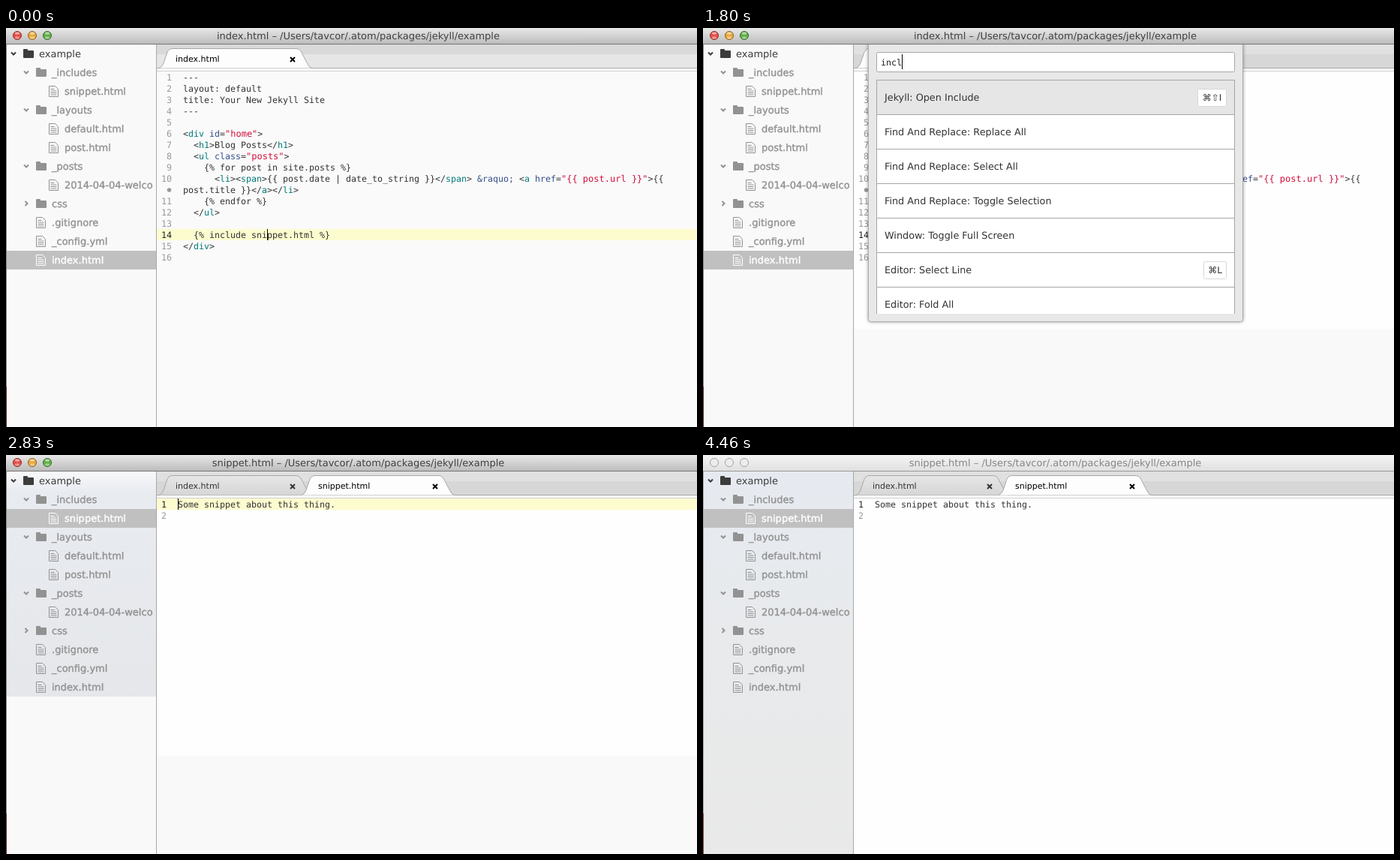
Animation of 921x532 px, one loop 4540 ms. Source, as an HTML page:

```html
<!DOCTYPE html>
<html lang="en">
<head>
<meta charset="utf-8">
<title>Editor: open include</title>
<style>
html, body { margin: 0; width: 100%; height: 100%; overflow: hidden; background: #f9f9f9; }
svg { display: block; width: 921px; height: 532px; }
text { white-space: pre; text-rendering: geometricPrecision; }
.ui { font: 13px "DejaVu Sans", "Noto Sans", sans-serif; }
.tree { stroke-width: .4px; }
.item { font: 12.8px "DejaVu Sans", "Noto Sans", sans-serif; }
.tab { font: 11px "DejaVu Sans", "Noto Sans", sans-serif; }
.key { font: 12px "DejaVu Sans", "Noto Sans", sans-serif; }
.code { font: 11.63px "DejaVu Sans Mono", "Noto Sans Mono", monospace; }
.string { font-size: 12px; }
.popup { filter: drop-shadow(0 0 2px rgba(0,0,0,.4)); }
</style>
</head>
<body>
<svg id="stage" viewBox="0 0 921 532" xmlns="http://www.w3.org/2000/svg">
  <defs>
    <linearGradient id="bar" x2="0" y2="1"><stop stop-color="#e8e8e8"/><stop offset="1" stop-color="#bababa"/></linearGradient>
    <linearGradient id="barIdle" x2="0" y2="1"><stop stop-color="#f5f5f5"/><stop offset="1" stop-color="#dfdfdf"/></linearGradient>
    <linearGradient id="tint" x2="0" y2="1"><stop stop-color="#f8f9fa"/><stop offset=".09" stop-color="#e8ebf0"/><stop offset="1" stop-color="#e5e7ea"/></linearGradient>
    <linearGradient id="tintIdle" x2="0" y2="1"><stop stop-color="#e6eaf0"/><stop offset=".5" stop-color="#e8eaeb"/><stop offset="1" stop-color="#e9e9e9"/></linearGradient>
    <linearGradient id="tabOff" x2="0" y2="1"><stop stop-color="#e6e6e6"/><stop offset="1" stop-color="#d6d6d6"/></linearGradient>
    <clipPath id="sideClip"><rect y="22" width="200" height="510"/></clipPath>
    <clipPath id="listClip"><rect x="231" y="69" width="479" height="312"/></clipPath>
  </defs>
  <g id="scene"></g>
</svg>
<script>
const LOOP = 4540;
const PATH = ' – /Users/tavcor/.atom/packages/jekyll/example';
const ROW = 15, CHAR = 7, TOP = 58;

const SOURCE = [
  '---', 'layout: default', 'title: Your New Jekyll Site', '---', '',
  '<div id="home">', '  <h1>Blog Posts</h1>', '  <ul class="posts">',
  '    {% for post in site.posts %}',
  '      <li><span>{{ post.date | date_to_string }}</span> &raquo; <a href="{{ post.url }}">{{',
  'post.title }}</a></li>',
  '    {% endfor %}', '  </ul>', '', '  {% include snippet.html %}', '</div>', ''
];
const WRAPPED = 10, ACTIVE = 14;

const TREE = [
  [0, 'open', 'example'], [1, 'open', '_includes'], [2, 'file', 'snippet.html'],
  [1, 'open', '_layouts'], [2, 'file', 'default.html'], [2, 'file', 'post.html'],
  [1, 'open', '_posts'], [2, 'file', '2014-04-04-welco'], [1, 'shut', 'css'],
  [1, 'file', '.gitignore'], [1, 'file', '_config.yml'], [1, 'file', 'index.html']
];

const INCLUDE = ['Jekyll: Open Include', '⌘⇧I'];
const LISTS = {
  all: [['Application: About'], ['Application: Bring All Windows To Front'], ['Application: Hide', '⌘H'],
    ['Application: Hide Other Applications', '⌥⌘H'], ['Application: Minimize', '⌘M'],
    ['Application: New File', '⌘N'], ['Application: New Window', '⌘⇧N']],
  in: [['Pane: Save Items'], ...[7, 8, 9, 6, 5, 4].map(n => ['Pane: Show Item ' + n, '⌘' + n])],
  inc: [INCLUDE, ['Window: Increase Font Size', '⌘+'], ['Find And Replace: Show', '⌘F'],
    ['Find And Replace: Find Next', '⌘G'], ['Find And Replace: Replace Next'],
    ['Find And Replace: Replace All'], ['Editor: Indent Selected Rows', '⌘]']],
  incl: [INCLUDE, ['Find And Replace: Replace All'], ['Find And Replace: Select All'],
    ['Find And Replace: Toggle Selection'], ['Window: Toggle Full Screen'],
    ['Editor: Select Line', '⌘L'], ['Editor: Fold All']],
  one: [INCLUDE]
};

// Each step changes only the listed parts of the state before it.
const STEPS = [
  [0, { file: 'index', title: 'index', side: 'index', caret: true, fresh: true }],
  [150, { caret: false }],
  [600, { list: 'all', query: '', fresh: false }],
  [1050, { caret: true }],
  [1350, { query: 'i' }],
  [1500, { query: 'in', list: 'in' }],
  [1650, { query: 'inc', list: 'inc' }],
  [1800, { query: 'incl', list: 'incl' }],
  [1940, { query: 'inclu', list: 'one' }],
  [2090, { query: 'include' }],
  [2230, { caret: false }],
  [2680, { list: null, title: 'snippet', caret: true }],
  [2830, { file: 'snippet', side: 'snippet' }],
  [3130, { caret: false }],
  [3420, { caret: true }],
  [3870, { caret: false }],
  [4320, { caret: true }],
  [4460, { caret: false, idle: true }]
];

const esc = s => s.replace(/&/g, '&amp;').replace(/</g, '&lt;');
const rect = (x, y, w, h, fill, more = '') =>
  `<rect x="${x}" y="${y}" width="${w}" height="${h}" fill="${fill}" ${more}/>`;
const box = (x, y, w, h, fill, stroke, r = 0) =>
  rect(x + .5, y + .5, w - 1, h - 1, fill, `stroke="${stroke}" rx="${r}"`);
const path = (d, fill, more = '') => `<path d="${d}" fill="${fill}" ${more}/>`;
const circle = (x, y, r, fill, more = '') =>
  `<circle cx="${x}" cy="${y}" r="${r}" fill="${fill}" ${more}/>`;
const label = (x, y, s, cls, fill, more = '') =>
  `<text x="${x}" y="${y}" class="${cls}" fill="${fill}" ${more}>${s}</text>`;

function highlight(line) {
  const paint = (s, color, cls = '') => `<tspan class="${cls}" fill="${color}">${esc(s)}</tspan>`;
  let out = '', last = 0;
  for (const m of line.matchAll(/(<\/?)(\w+)|(\w+)(?==")|("[^"]*")|(&\w+;)/g)) {
    out += esc(line.slice(last, m.index));
    if (m[2]) out += esc(m[1]) + paint(m[2], '#067a7a');
    else if (m[4]) out += paint(m[4], '#d0103c', 'string');
    else out += paint(m[0], '#34508c');
    last = m.index + m[0].length;
  }
  return out + esc(line.slice(last));
}

function titleBar({ title, idle }) {
  const lights = ['#e5504a', '#eaa93f', '#62b04a'], rims = ['#8c302c', '#8a631f', '#3a6c2b'];
  return rect(0, 0, 921, 22, idle ? 'url(#barIdle)' : 'url(#bar)') +
    rect(0, 21, 921, 1, idle ? '#999' : '#777') +
    lights.map((color, i) => {
      const x = 15 + 20 * i;
      if (idle) return circle(x, 10, 5.5, '#ededed', 'stroke="#a2a2a2"');
      return circle(x, 10, 5.5, color, `stroke="${rims[i]}"`) +
        `<ellipse cx="${x}" cy="7" rx="3" ry="1.5" fill="#fff" opacity=".55"/>` +
        `<ellipse cx="${x}" cy="13" rx="3" ry="1.7" fill="#fff" opacity=".4"/>`;
    }).join('') +
    label(469.5, 15, title + '.html' + PATH, 'ui', idle ? '#858585' : '#404040', 'text-anchor="middle"');
}

function treeIcon(kind, x, y, color) {
  if (kind === 'file') {
    return path(`M${x + .5} ${y - 6.5}h8l4 4v10h-12zM${x + 2.5} ${y - 2.5}h5m-5 2.5h8m-8 2.5h8m-8 2.5h8`, 'none', `stroke="${color}"`);
  }
  const cx = x - 13;
  const arrow = kind === 'open' ? `M${cx - 3} ${y - 1.5}l3 3 3-3` : `M${cx - 1.5} ${y - 3}l3 3-3 3`;
  return path(arrow, 'none', `stroke="${color}" stroke-width="2"`) +
    path(`M${x} ${y + 5}v-10q0-1 1-1h4q1 0 1 1v1h7q1 0 1 1v8q0 1-1 1h-12q-1 0-1-1z`, color);
}

function sidebar({ side, idle }) {
  let out = rect(0, 22, 200, 510, idle ? 'url(#tintIdle)' : '#f9f9f9');
  if (side === 'snippet' && !idle) out += rect(1, 22, 199, 300, 'url(#tint)');
  TREE.forEach(([depth, kind, name], i) => {
    const y = 34 + 25 * i, chosen = name === side + '.html';
    const color = chosen ? '#fff' : depth ? '#929292' : '#3c3c3c';
    if (chosen) out += rect(1, y - 12, 199, 25, '#c0c0c0');
    out += treeIcon(kind, 23 + 17 * depth, y, color) +
      label(44 + 17 * depth, y + 5, name, 'ui tree', color, depth ? `stroke="${color}"` : '');
  });
  return `<g clip-path="url(#sideClip)">${out}</g>` + rect(200, 22, 1, 510, '#a9a9a9') +
    rect(0, 22, 1, 456, idle ? '#a5a5a5' : '#858585') + rect(0, 478, 1, 54, idle ? '#8a4636' : '#5c2f29');
}

function tab(x, name, active) {
  const outline = `M${x} 53.5Q${x + 4} 52 ${x + 6} 47L${x + 11} 32Q${x + 13} 27.5 ${x + 17} 27.5` +
    `H${x + 183}Q${x + 187} 27.5 ${x + 189} 31L${x + 198} 48Q${x + 200} 53 ${x + 204} 53.5`;
  return path(outline, active ? '#fdfdfd' : 'url(#tabOff)', 'stroke="#a8a8a8"') +
    label(x + 22, 45, name, 'tab', active ? '#000' : '#333') +
    path(`M${x + 175} 39l6 6m0-6l-6 6`, 'none', `stroke="${active ? '#000' : '#333'}" stroke-width="2"`);
}

function tabBar({ file, fresh }) {
  const [upper, lower] = fresh ? ['#d9d9d9', '#e6e6e6'] : ['#e0e0e0', '#d7d7d7'];
  const second = file === 'snippet';
  return rect(201, 22, 720, 13, upper) + rect(201, 35, 720, 18, lower) +
    rect(201, 53, 720, 1, '#a8a8a8') + rect(201, 54, 720, 3, '#fafafa') + rect(201, 57, 720, 1, '#d2d2d2') +
    tab(204, 'index.html', !second) + (second ? tab(394, 'snippet.html', true) : '');
}

function editor(s) {
  const { file, fresh, idle, list, caret } = s;
  const index = file === 'index', left = index ? 236 : 229;
  const lines = index ? SOURCE : ['Some snippet about this thing.', ''];
  const current = index ? ACTIVE : 0, rowY = TOP + ROW * current;
  let out = rect(201, 22, 720, 510, fresh ? '#fafafa' : '#fefefe');
  if (!fresh && !idle) out += rect(201, 401, 720, 131, '#f9f9f9');
  if (!list && !idle) out += rect(201, rowY, 720, ROW, '#fdfccf');
  let number = 0;
  lines.forEach((line, i) => {
    const y = TOP + ROW * i + 12;
    if (index && i === WRAPPED) out += circle(left - 18.5, y - 4, 2.8, '#999');
    else out += label(left - 15, y, ++number, 'code', i === current ? '#222' : '#999', 'text-anchor="end"');
    out += label(left, y, highlight(line), 'code', '#333');
  });
  if (caret && !list) out += rect(left + (index ? 16 * CHAR : 0), rowY, 1, ROW, '#000');
  return out + tabBar(s);
}

function badge(keys, y) {
  const narrow = { H: 9, M: 10, N: 9, I: 3 }[keys.at(-1)] || 7;
  const w = 24 + narrow + 12 * (keys.length - 2);
  return box(698 - w, y - 11, w, 24, '#fff', '#d8d8d8', 2) +
    label(698 - w / 2, y + 5, keys, 'key', '#333', 'text-anchor="middle"');
}

function palette({ list, query, caret }) {
  if (!list) return '';
  const items = LISTS[list], single = items.length === 1;
  const height = single ? 117 : 382;
  let rows = '';
  items.forEach(([name, keys], i) => {
    const y = 69 + 46 * i;
    rows += box(231, y, 478, 47, i ? '#fff' : '#e6e6e6', '#a6a6a6') +
      label(242, y + 28, name, 'item', '#333') + (keys ? badge(keys, y + 23) : '');
  });
  return `<g class="popup">${box(220, 10, 500, height, '#e8e8e8', '#adadad', 3)}</g>` +
    box(231, 32, 478, 27, '#fff', '#a6a6a6', 2) +
    label(237, 50, query, 'code', '#222') +
    (caret ? rect(237 + CHAR * query.length, 35, 1, 20, '#000') : '') +
    `<g clip-path="url(#listClip)">${rows}</g>`;
}

const scene = document.getElementById('scene');
let shown = -1;

function draw(time) {
  const step = STEPS.findLastIndex(([start]) => start <= time);
  if (step === shown) return;
  shown = step;
  const state = Object.assign({}, ...STEPS.slice(0, step + 1).map(([, change]) => change));
  scene.innerHTML = editor(state) + palette(state) + sidebar(state) + titleBar(state);
}

const began = performance.now();
function tick() {
  draw((performance.now() - began) % LOOP);
  requestAnimationFrame(tick);
}
tick();
</script>
</body>
</html>
```
